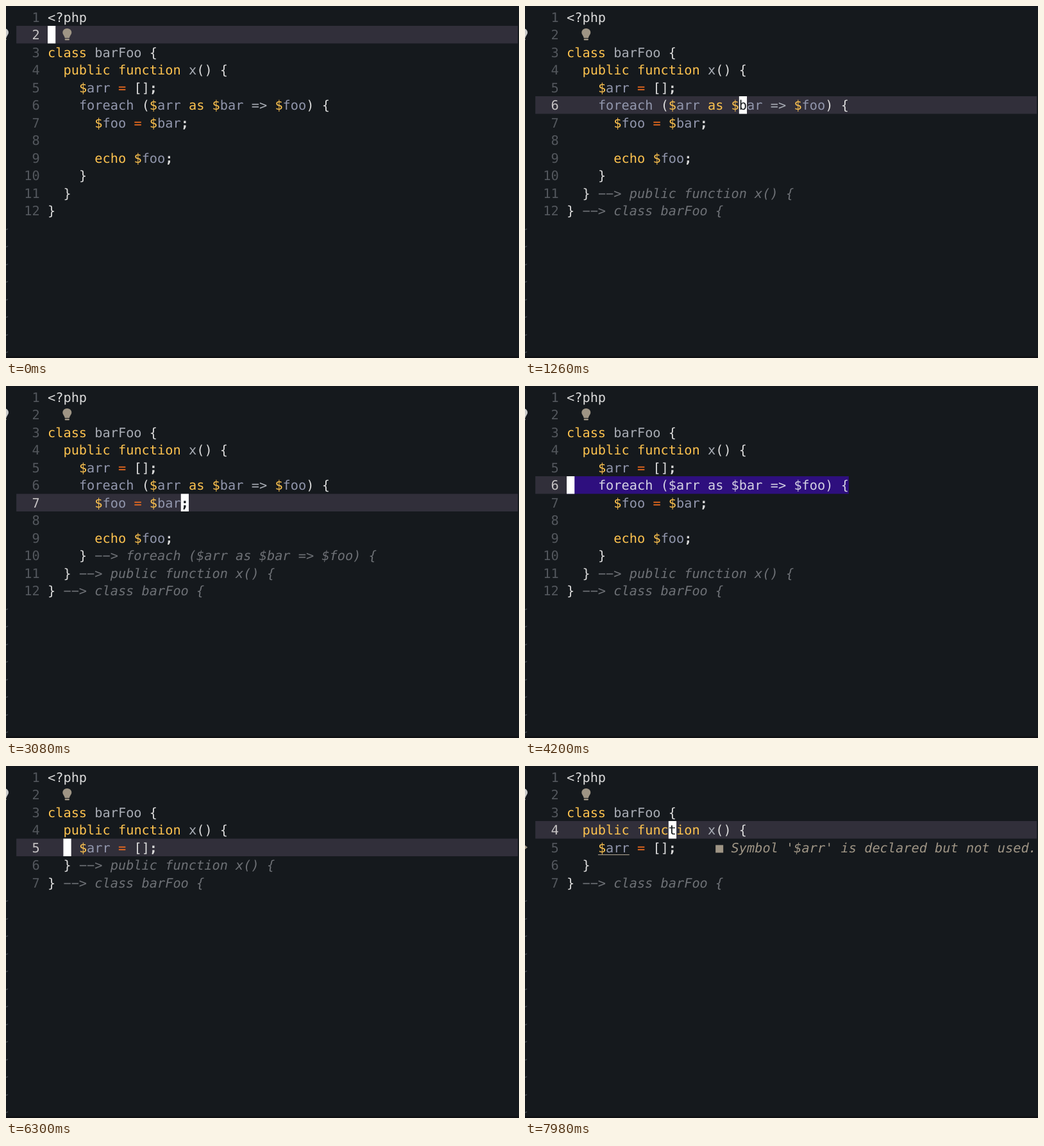
These frames come from a looping animation (800x550 px, 8000 ms). An HTML page:

```html
<!DOCTYPE html>
<html lang="en">
<head>
<meta charset="utf-8">
<title>Code editor</title>
<style>
  html, body { margin: 0; width: 100%; height: 100%; overflow: hidden; background: #15191d; }
  svg { display: block; width: 100vw; height: 100vh; }
  text {
    font: 20.3px "DejaVu Sans Mono", monospace;
    text-rendering: geometricPrecision;
    white-space: pre;
  }
  .bold { font-weight: bold; }
  .note { font-style: italic; }
</style>
</head>
<body>
<svg id="stage" viewBox="0 0 800 550"></svg>
<script>
const LOOP = 8000, CELL = 12.22, ROW = 27.5, LEFT = 65, TOP = 3.5, ROWS = 20;
const C = {
  back: '#15191d', line: '#312f3a', select: '#2e0f7e', selected: '#d5d3e4',
  plain: '#dcdcdc', name: '#a9adb5', variable: '#9297ad', keyword: '#fec34f',
  operator: '#f9701f', number: '#53575d', current: '#c6c3c4',
  hint: '#6e7176', warn: '#9f9585', tilde: '#41464c', cursor: '#ffffff'
};

const SOURCE = `<?php

class barFoo {
  public function x() {
    $arr = [];
    foreach ($arr as $bar => $foo) {
      $foo = $bar;

      echo $foo;
    }
  }
}`.split('\n');

// Key presses as [time, key]; "!" marks the diagnostic arriving.
const press = (keys, start, step = 0) => [...keys].map((key, i) => [start + i * step, key]);
const KEYS = [
  ...press('jj', 140, 140),
  ...press('l'.repeat(22), 350, 24),
  ...press('jjjjjj', 1050, 120),
  ...press('kkk', 2310, 280),
  ...press('k', 3430),
  ...press('0', 3700),
  ...press('V', 3990),
  ...press('jjjj', 4340, 140),
  ...press('$', 4970),
  ...press('d', 5990),
  ...press('k', 6160),
  ...press('k', 6860),
  ...press('l'.repeat(4), 7000, 70),
  ...press('!', 7250),
  ...press('l'.repeat(7), 7280, 70)
];

function apply(s, key) {
  if (key === 'j') s.row++;
  if (key === 'k') s.row--;
  if (key === 'l') s.want++;
  if (key === '0') s.want = 0;
  if (key === '$') s.want = Infinity;
  if (key === 'V') s.anchor = s.row;
  if (key === '!') s.warned = true;
  if (key === 'd') {
    s.lines.splice(s.anchor, s.row - s.anchor + 1);
    s.row = s.anchor;
    s.want = s.lines[s.row].search(/\S/);
    s.anchor = -1;
  }
  const length = s.lines[s.row].length;
  s.col = Math.max(0, Math.min(s.want, s.anchor < 0 ? length - 1 : length));
}

function stateAfter(count) {
  const s = { lines: [...SOURCE], row: 1, col: 0, want: 0, anchor: -1, warned: false };
  KEYS.slice(0, count).forEach(([, key]) => apply(s, key));
  return s;
}

function findPairs(lines) {
  const open = [], pairs = [];
  lines.forEach((line, row) => [...line].forEach((ch, col) => {
    if ('({['.includes(ch)) open.push({ row, col });
    if (')}]'.includes(ch)) pairs.push({ from: open.pop(), to: { row, col }, block: ch === '}' });
  }));
  return pairs;
}

const x = col => LEFT + col * CELL;
const y = row => TOP + row * ROW;
const escapeText = s => s.replace(/&/g, '&amp;').replace(/</g, '&lt;');
const box = (left, top, width, height, fill) =>
  `<rect x="${left}" y="${top}" width="${width}" height="${height}" fill="${fill}"/>`;
const cells = (row, col, count, fill) => box(x(col), y(row), count * CELL, ROW, fill);
const print = (row, col, str, fill, style = '') =>
  `<text x="${x(col)}" y="${y(row) + 21.3}" fill="${fill}" class="${style}">${escapeText(str)}</text>`;

function bulb(cx, cy, fill) {
  return `<g transform="translate(${cx} ${cy})" fill="${fill}">
    <path d="M-3.6 5.5C-3.6 3-7-.2-7-3A7 6.6 0 0 1 7-3C7-.2 3.6 3 3.6 5.5Z"/>
    <rect x="-3.6" y="6.5" width="7.2" height="2.6" rx="1"/></g>`;
}

function tokenColor(token, before) {
  if (/^(class|public|function|as|echo|\$)$/.test(token)) return C.keyword;
  if (token === '=') return C.operator;
  if (token === 'foreach' || before === '$') return C.variable;
  if (token === '=>' || /^\w/.test(token)) return C.name;
  return C.plain;
}

function codeLine(line, row, isSelected, isMatch) {
  let out = '';
  for (const m of line.matchAll(/<\?php|=>|\w+|\S/g)) {
    const color = isSelected ? C.selected : tokenColor(m[0], line[m.index - 1]);
    const bold = m[0] === ';' || isMatch(row, m.index);
    out += print(row, m.index, m[0], color, bold ? 'bold' : '');
  }
  return out;
}

function draw(s) {
  const { lines, row, col } = s;
  const visual = s.anchor >= 0;
  const pairs = findPairs(lines);
  const at = p => p.row === row && p.col === col;
  const active = pairs.find(p => at(p.from) || at(p.to));
  const isMatch = (r, c) => !!active && [active.from, active.to].some(p => p.row === r && p.col === c);
  const isSelected = r => visual && r >= s.anchor && r <= row;

  let out = box(0, 0, 800, 550, C.back) + box(0, 547.5, 800, 2.5, '#0e1013');
  out += cells(row, -4, visual ? 4 : 64, C.line);

  lines.forEach((line, r) => {
    const label = String(r + 1);
    if (isSelected(r)) out += cells(r, 0, Math.max(1, line.length), C.select);
    out += print(r, -1 - label.length, label, r === row ? C.current : C.number);
    out += codeLine(line, r, isSelected(r), isMatch);
  });
  for (let r = lines.length; r < ROWS; r++) out += print(r, -6, '~', C.tilde);

  // Closing braces name the block the cursor is in.
  for (const { from, to, block } of pairs) {
    const inside = row > from.row && (row < to.row || (row === to.row && col <= to.col));
    if (block && inside) {
      out += print(to.row, to.col + 2, '\u2212\u2212> ' + lines[from.row].trim(), C.hint, 'note');
    }
  }

  out += bulb(-3, 44.5, '#c9c9c9') + bulb(95.3, 44.5, C.warn);

  if (s.warned) {
    const top = y(4);
    out += `<path d="M-3 ${top + 8}L4 ${top + 13.5}L-3 ${top + 19}Z" fill="${C.warn}"/>`;
    out += box(x(4), top + 24.5, CELL * 4, 1.2, C.warn);
    out += box(x(19), top + 10, 12, 12, C.warn);
    out += print(4, 21, "Symbol '$arr' is declared but not used.", C.warn, 'note');
  }

  const under = lines[row][col] || ' ';
  out += cells(row, col, 1, C.cursor);
  out += print(row, col, under, C.back, under === ';' || isMatch(row, col) ? 'bold' : '');
  return out;
}

const stage = document.getElementById('stage');
let shown = -1;

function render(now) {
  const t = now % LOOP;
  const count = KEYS.filter(([time]) => time <= t).length;
  if (count !== shown) {
    shown = count;
    stage.innerHTML = draw(stateAfter(count));
  }
}

const began = performance.now();
function tick() {
  render(performance.now() - began);
  requestAnimationFrame(tick);
}
tick();
</script>
</body>
</html>
```
